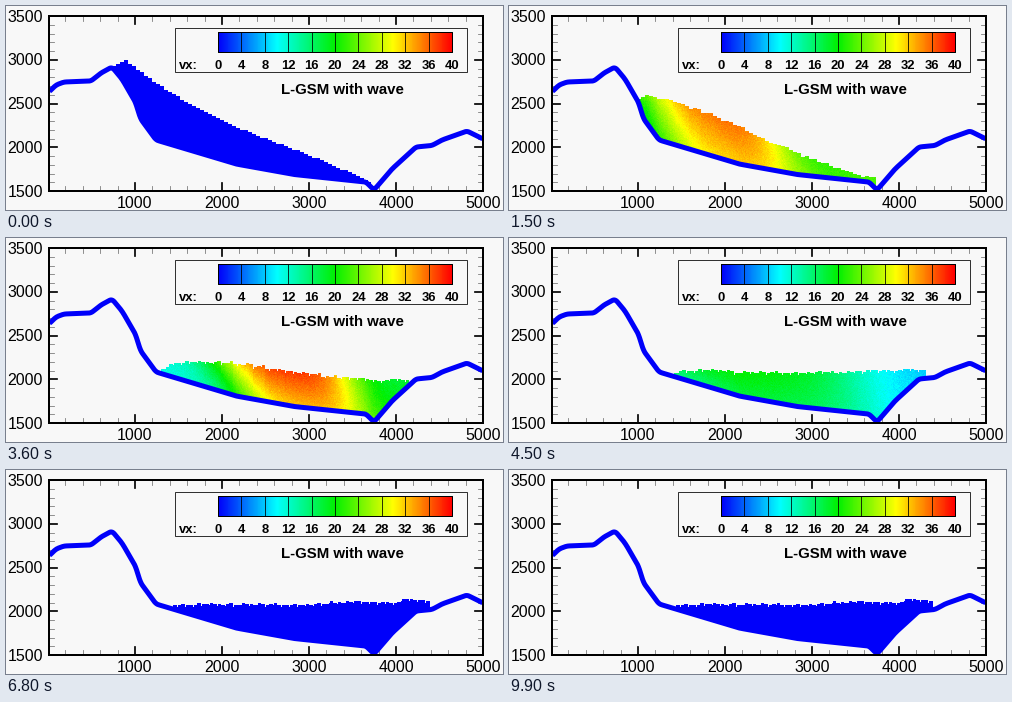
These frames come from a looping animation (497 by 204 pixels, 10000 ms). A matplotlib script:

```python
import numpy as np
import matplotlib.pyplot as plt
from matplotlib.animation import FuncAnimation
from matplotlib.colors import LinearSegmentedColormap
from matplotlib.patches import Rectangle

W, H, DPI = 497, 204, 64
PX = 72 / DPI
FRAMES, STEP = 100, 100
BLUE = "#0000fa"
PAPER = "#f8f8f8"
LEFT, RIGHT, TOP, BOTTOM = 43, 477, 10, 185

plt.rcParams["font.family"] = "Liberation Sans"
rainbow = LinearSegmentedColormap.from_list(
    "speed", [BLUE, "#00ffff", "#00f000", "#ffff00", "#ff0000"])

# Corners of the valley floor, rounded off below
corners = [(43, 86), (50, 79), (58, 76), (85, 75), (95, 67), (106, 61),
           (116, 73), (130, 97), (134, 112), (150, 134), (230, 158),
           (288, 168.5), (360, 176), (368, 184), (386, 163), (410, 141),
           (426, 139.5), (436, 134), (461, 125), (477, 133)]

# Key poses: when (s), where the mass lies, how its surface bends, how it flows
poses = [
    dict(t=0.0, left=106, right=365, y0=44, y1=176, sag=13, skew=4,
         back=0, front=0, boost=0, centre=.32, width=.3),
    dict(t=1.5, left=128, right=367, y0=86, y1=173, sag=-1, skew=-4,
         back=16, front=23, boost=17, centre=.32, width=.3),
    dict(t=2.3, left=134, right=384, y0=110, y1=164, sag=-8, skew=-6,
         back=12, front=2, boost=42, centre=.52, width=.4),
    dict(t=3.6, left=151, right=403, y0=126, y1=141, sag=-2, skew=-4,
         back=11, front=18, boost=23, centre=.51, width=.28),
    dict(t=4.5, left=161, right=417, y0=131, y1=131, sag=3, skew=0,
         back=14, front=8, boost=8, centre=.4, width=.35),
    dict(t=6.3, left=163, right=424, y0=133, y1=130, sag=2, skew=0,
         back=-1, front=-11, boost=0, centre=.4, width=.35),
]

cols = np.arange(W) + 0.5
rows = np.arange(H)[:, None] + 0.5
ROUND = 5
wide = np.interp(np.arange(-2, W + 2) + 0.5, *np.transpose(corners))
bed = np.convolve(wide, np.ones(ROUND) / ROUND, "valid")
rng = np.random.default_rng(4)
bumps = rng.integers(-1, 2, W)
grain = rng.normal(0, 0.35, (H, W))


def pose_at(t):
    t = min(t, poses[-1]["t"])
    i = max(k for k, p in enumerate(poses[:-1]) if p["t"] <= t)
    a, b = poses[i], poses[i + 1]
    u = (t - a["t"]) / (b["t"] - a["t"])
    # The mass starts from rest: speed grows with t, distance with t squared
    moving = ("left", "right", "y0", "y1", "sag", "skew")
    return {k: a[k] + (b[k] - a[k]) * (u * u if i == 0 and k in moving else u)
            for k in a}


def surface(p, x):
    s = np.clip((x - p["left"]) / (p["right"] - p["left"]), 0, 1)
    y = (p["y0"] + (p["y1"] - p["y0"]) * s
         + p["sag"] * np.sin(np.pi * s) + p["skew"] * np.sin(2 * np.pi * s))
    flank = np.interp(p["left"], cols, bed) - 0.7 * (x - p["left"])
    return np.maximum(y, flank)


def flow(p, s, depth):
    q = np.abs(s - p["centre"] - 0.07 * depth) / p["width"]
    drift = p["back"] + (p["front"] - p["back"]) * s
    return drift + p["boost"] * (1 - 0.25 * depth) * np.exp(-q ** 3)


def fluid(t):
    p = pose_at(t)
    # Particles give the surface a stepped, slightly ragged edge
    offset = cols - p["left"]
    block = np.floor(offset / 4).astype(int)
    edge = np.round(surface(p, p["left"] + block * 4 + 2) / 2) * 2
    edge += bumps[block % W] * min(t, 1)
    if t > 2:
        edge += 2 * (offset % 8 < 1)

    s = offset / (p["right"] - p["left"])
    depth = np.clip((rows - edge) / np.maximum(bed - edge, 1), 0, 1)
    v = flow(p, s, depth)
    v += grain * np.clip(v / 8, 0, 1)
    rgba = rainbow(np.clip(v / 40, 0, 1))
    rgba[..., 3] = (s >= 0) & (s <= 1) & (rows >= edge) & (rows <= bed + 1)
    return rgba


fig = plt.figure(figsize=(W / DPI, H / DPI), dpi=DPI, facecolor=PAPER)
ax = fig.add_axes([0, 0, 1, 1])
ax.set_axis_off()


def line(x, y, width, color="black", **kw):
    ax.plot(x, y, lw=width * PX, color=color, **kw)


def label(x, y, text, size, **kw):
    ax.text(x, y, text, fontsize=size * PX, va="baseline", **kw)


def box(x0, y0, x1, y1, width, z):
    ax.add_patch(Rectangle((x0, y0), x1 - x0, y1 - y0, fill=False,
                           lw=width * PX, ec="black", zorder=z))


def x_pos(v):
    return RIGHT - (5000 - v) * 0.087


def y_pos(v):
    return BOTTOM - (v - 1500) * 0.0875


def tick_style(major):
    return (8, 1.7, "black") if major else (5, 0.8, "#777777")


def draw_axes():
    box(LEFT, TOP, RIGHT, BOTTOM, 2, 6)
    for v in range(200, 5000, 200):
        size, width, color = tick_style(v % 1000 == 0)
        for y, way in ((TOP, 1), (BOTTOM, -1)):
            line([x_pos(v)] * 2, [y, y + way * size], width, color, zorder=2)
    for v in range(1600, 3500, 100):
        size, width, color = tick_style(v % 500 == 0)
        for x, way in ((LEFT, 1), (RIGHT, -1)):
            line([x, x + way * size], [y_pos(v)] * 2, width, color, zorder=2)
    for v in range(1000, 5001, 1000):
        label(x_pos(v), 201.5, v, 16, ha="center")
    for v in range(1500, 3501, 500):
        label(37, y_pos(v) + 5.7, v, 16, ha="right")


def draw_legend():
    x0, x1, y0, y1 = 212, 446, 26, 46
    box(169, 22, 461, 66, 0.8, 5)
    ax.imshow(np.linspace(0, 1, 256)[None], cmap=rainbow, aspect="auto",
              extent=(x0, x1, y1, y0), zorder=4)
    box(x0, y0, x1, y1, 1, 5)
    for v in range(0, 41, 4):
        x = x0 + (x1 - x0) * v / 40
        line([x, x], [y0, y1], 0.8, zorder=5)
        label(x, 63, v, 13, ha="center", weight="bold")
    label(173, 63, "vx:", 13, weight="bold")
    label(275, 88.5, "L-GSM with wave", 15, weight="bold")


draw_axes()
draw_legend()
water = ax.imshow(fluid(0), extent=(0, W, H, 0), aspect="auto",
                  interpolation="nearest", zorder=3)
line(cols[LEFT:RIGHT], bed[LEFT:RIGHT], 5, BLUE, zorder=4,
     solid_joinstyle="round", solid_capstyle="butt")
ax.set_xlim(0, W)
ax.set_ylim(H, 0)


def update(frame):
    water.set_data(fluid(frame * STEP / 1000))
    return [water]


anim = FuncAnimation(fig, update, frames=FRAMES, interval=STEP, repeat=True)
plt.show()
```
